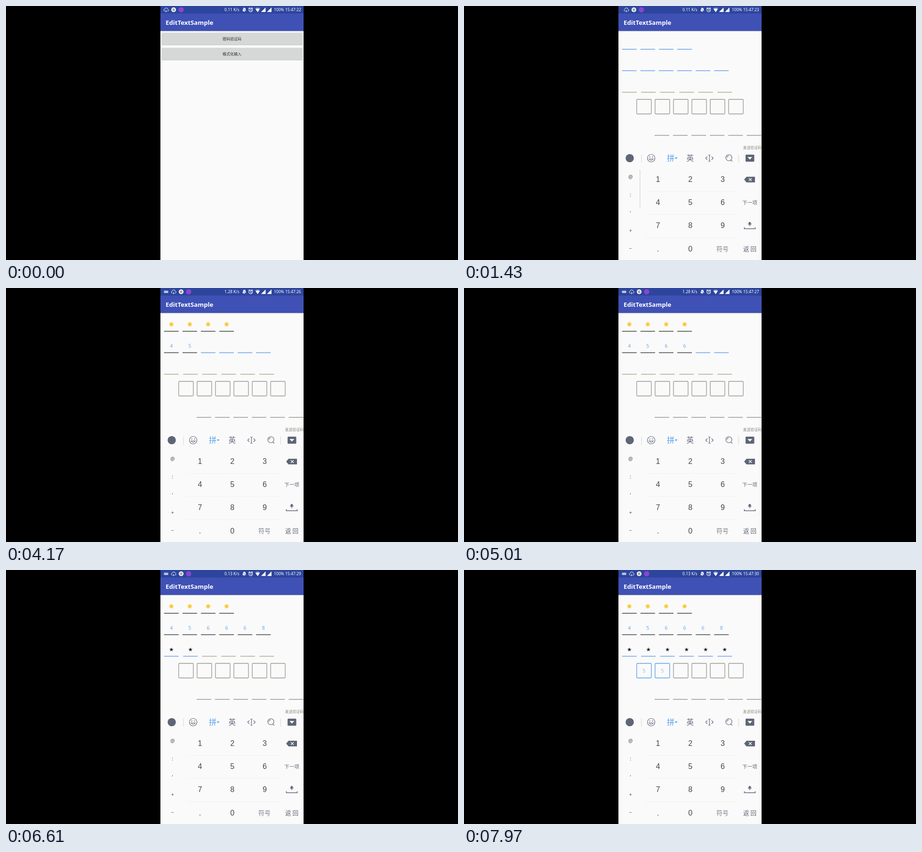
An HTML page with a canvas that plays this animation: 960x540 px, repeating every 8000 ms.

```html
<!DOCTYPE html>
<html lang="zh">
<head>
<meta charset="utf-8">
<title>EditTextSample</title>
<style>
html, body { margin: 0; width: 100%; height: 100%; overflow: hidden; background: #000; }
canvas { display: block; }
</style>
</head>
<body>
<canvas id="stage" width="960" height="540"></canvas>
<script>
const c = document.getElementById('stage').getContext('2d');
const LOOP = 8000;
const SANS = '"Noto Sans", "Open Sans", sans-serif';
const CJK = '"Noto Sans CJK SC", "Noto Sans CJK", sans-serif';
const ARIAL = '"Liberation Sans", sans-serif';
const PAPER = '#fafafa', PRIMARY = '#3f51b5', PRIMARY_DARK = '#2d459d';
const INK = '#5e6676', BLUE = '#6ea6ea', SKY = '#559fee';
const OLIVE = '#b0ae8c', GREY = '#a09f94', DARK = '#4c4c4a';

// Moments at which each character is entered
const typed = {
  suns: [1800, 2050, 2300, 2550],
  digits: [3500, 3880, 4300, 4720, 5300, 5620],
  stars: [6080, 6420, 6820, 7020, 7220, 7420],
  boxes: [7680, 7880]
};

const progress = (t, start, length) => Math.min(1, Math.max(0, (t - start) / length));
const easeOut = (u, power) => 1 - (1 - u) ** power;

function text(s, x, y, size, color, font = CJK, weight = 400, align = 'center') {
  c.font = `${weight} ${size}px ${font}`;
  c.textAlign = align;
  c.fillStyle = color;
  c.fillText(s, x, y + size * 0.37);
}

function rect(x, y, w, h, color) {
  c.fillStyle = color;
  c.fillRect(x, y, w, h);
}

function roundRect(x, y, w, h, r) {
  c.beginPath();
  c.roundRect(x, y, w, h, r);
}

function dot(x, y, r, color) {
  c.fillStyle = color;
  c.beginPath();
  c.arc(x, y, r, 0, 7);
  c.fill();
}

function shape(path, x, y, color) {
  c.save();
  c.translate(x, y);
  c.fillStyle = color;
  c.fill(new Path2D(path));
  c.restore();
}

function outline(path, x, y, color, width = 1.2) {
  c.save();
  c.translate(x, y);
  c.strokeStyle = color;
  c.lineWidth = width;
  c.stroke(new Path2D(path));
  c.restore();
}

function star(x, y, points, outer, inner, color) {
  c.fillStyle = color;
  c.beginPath();
  for (let i = 0; i < points * 2; i++) {
    const r = i % 2 ? inner : outer, a = i * Math.PI / points - Math.PI / 2;
    c.lineTo(x + r * Math.cos(a), y + r * Math.sin(a));
  }
  c.fill();
}

function sun(x, y) {
  star(x, y, 8, 5.6, 3.6, '#fcd75a');
  dot(x, y, 2.6, '#f8c544');
}

function button(label, y) {
  c.save();
  c.fillStyle = '#d6d7d7';
  c.shadowColor = 'rgba(60,60,60,.4)';
  c.shadowBlur = 1.5;
  c.shadowOffsetY = 0.6;
  roundRect(330.5, y, 299.5, 25.5, 1.5);
  c.fill();
  c.restore();
  text(label, 480, y + 12.7, 8, '#2e2e2e', CJK, 500);
}

function windowFrame() {
  rect(328, 0, 304, 540, PAPER);
  rect(328, 53, 304, 1, '#d6d6da');
  rect(328, 54, 304, 1, '#ececee');
  rect(328, 0, 304, 16, PRIMARY_DARK);
  rect(328, 16, 304, 37, PRIMARY);
  text('EditTextSample', 339, 35, 13.2, '#fff', SANS, 600, 'left');
}

function menuScreen() {
  windowFrame();
  button('密码验证码', 57);
  button('格式化输入', 89);
}

// A row of underlines, each with an optional symbol above once typed
function lines(t, x, y, count, pitch, width, empty, filled, times = [], symbol) {
  for (let i = 0; i < count; i++) {
    const done = t >= times[i];
    rect(x + i * pitch, y - 0.8, width, 1.6, done ? filled : empty);
    if (done) symbol(x + i * pitch + width / 2, y - 14.8, i);
  }
}

function inputScreen(t) {
  windowFrame();
  lines(t, 335.7, 92, 4, 39.1, 31, BLUE, DARK, typed.suns, sun);
  lines(t, 335.7, 137.5, 6, 39.1, 31, BLUE, DARK, typed.digits,
    (x, y, i) => text('456668'[i], x, y + 0.3, 10.5, BLUE, SANS));
  lines(t, 335.7, 183.4, 6, 40.5, 31, OLIVE, BLUE, typed.stars,
    (x, y) => star(x, y + 0.6, 5, 4.7, 1.9, '#222'));
  for (let i = 0; i < 6; i++) {
    const x = 366.8 + i * 39.05, done = t >= typed.boxes[i];
    c.strokeStyle = done ? SKY : '#96958a';
    c.lineWidth = 1.3;
    roundRect(x, 198.5, 31, 31, 1.5);
    c.stroke();
    if (done) text('5', x + 15.5, 214.2, 10, '#8fb8e2', SANS);
  }
  lines(t, 404.8, 275, 6, 39.1, 31, GREY);
  text('发送验证码', 592.5, 301, 7.9, '#85857f', CJK, 400, 'left');
  lines(t, 404.8, 312, 4, 29.6, 22.3, BLUE);
  button('改变输入方式', 324);
}

function toolbar() {
  const y = 323.5;
  dot(352, y, 8.7, INK);
  rect(376.5, 316, 1, 17, '#d4d4cc');
  rect(582.8, 316, 1, 17, '#d4d4cc');
  outline('M8 0A8 8 0 1 1-8 0A8 8 0 1 1 8 0M-4.5 1.5Q0 7.5 4.5 1.5Z', 397.5, y, INK);
  dot(394.6, y - 2.5, 1.1, INK);
  dot(400.4, y - 2.5, 1.1, INK);
  text('拼', 439, y - 0.5, 16, SKY);
  shape('M-3-1.5H3L0 2Z', 450.5, y, SKY);
  text('英', 480.3, y - 0.5, 15.5, INK);
  outline('M-2.5-6.5H2.5M0-6.5V6.5M-2.5 6.5H2.5M-4.5-3.5L-8 0L-4.5 3.5M4.5-3.5L8 0L4.5 3.5', 521.3, y, INK);
  outline('M6.5-1A6.5 6.5 0 1 1-6.5-1A6.5 6.5 0 1 1 6.5-1M4.3 4L7.5 7.2M-4-1A4 4 0 0 1 0-5', 562.5, y, INK);
  c.fillStyle = INK;
  roundRect(598, 316, 18.5, 15, 1.5);
  c.fill();
  shape('M-5-2.5H5L0 3Z', 607.2, y, PAPER);
}

function keyboard(t) {
  rect(328, 306, 304, 234, PAPER);
  toolbar();
  const scrollbar = 1 - progress(t, 1750, 250);
  rect(373.3, 348, 1, 80, `rgba(205,205,190,${scrollbar})`);
  for (const y of [394, 443.2, 492.2]) rect(384, y, 199, 0.8, '#efefee');
  [...'123456789.0'].forEach((key, i) =>
    text(key, 412 + i % 3 * 68.7, 367.8 + Math.floor(i / 3) * 49.3, 16, '#42454d', ARIAL));
  text('符号', 549, 516, 13, '#7a7f8a');
  [['@', 363.5], [':', 401], [',', 434.5], ['+', 477], ['−', 515.5]].forEach(([s, y]) =>
    text(s, 353.7, y, 10.5, '#42454d', SANS, 500));
  shape('M-12 0L-7-6H11V6H-7Z', 607, 369, INK);
  outline('M-2-3L4 3M4-3L-2 3', 607, 369, PAPER, 1.4);
  text('下一项', 607, 418, 10.7, INK);
  c.fillStyle = INK;
  roundRect(604.7, 459, 4.4, 6, 2.2);
  c.fill();
  outline('M-3.5-3Q-3.5 1 0 1Q3.5 1 3.5-3M0 1V3.5', 607, 465, INK, 0.9);
  outline('M-11.5-3V0H11.5V-3', 607, 473.5, INK, 1.7);
  text('返 回', 607, 516.3, 12.6, INK);
}

function statusBar(t) {
  const shift = 16 * easeOut(progress(t, 1390, 250), 2);
  const y = 8;
  c.save();
  c.globalAlpha = progress(t, 1440, 200);
  c.fillStyle = '#cfd9ea';
  roundRect(335.5, 5.8, 9, 4.6, 1);
  c.fill();
  for (let i = 0; i < 3; i++) rect(337 + i * 2.4, 7.2, 1.2, 0.9, PRIMARY_DARK);
  c.restore();

  outline('M-2.5 3H-3A2.3 2.3 0 0 1-3-1.5A3.3 3.3 0 0 1 3.4-1.5A2.3 2.3 0 0 1 3 3H2.5M0 4.5V0.5M-1.5 3L0 4.5L1.5 3',
    340 + shift, y, '#fff', 1);
  dot(356 + shift, y, 5, '#fff');
  dot(356 + shift, y, 2.9, '#a5a5a3');
  dot(372 + shift, y, 5.6, '#8a45d0');

  const speed = t < 2500 ? '0.11' : t < 5500 ? '1.28' : '0.13';
  const label = (s, x) => text(s, x, y, 8.5, '#fff', SANS, 500, 'left');
  label(speed + ' K/s', 464);
  label('100%', 569);
  label('15:47:' + (22 + Math.floor((t + 470) / 1000)), 593);

  shape('M-4 3L-3 1.5V-1Q-3-4 0-4.3Q3-4 3-1V1.5L4 3ZM-1.2 3.6H1.2L0 5Z', 506, y, '#fff');
  outline('M-4.5-4.5L4.5 4.5', 506, y, PRIMARY_DARK, 1);
  outline('M3.8 .5A3.8 3.8 0 1 1-3.8 .5A3.8 3.8 0 1 1 3.8 .5M0-1.8V.8L1.8 1.8M-4.6-2.5L-2.2-4.5M4.6-2.5L2.2-4.5',
    519.7, y, '#fff', 1.2);
  shape('M-5.5-3Q0-6.5 5.5-3L0 5Z', 534.5, y, '#8b9acb');
  shape('M-4.2-1Q0-3.5 4.2-1L0 5Z', 534.5, y, '#fff');
  for (const x of [546.7, 559.2]) shape('M-5 4.7H4.7V-5Z', x, y, '#fff');
}

function draw(t) {
  rect(0, 0, 960, 540, '#000');
  c.save();
  c.beginPath();
  c.rect(328, 0, 304, 540);
  c.clip();

  if (t < 820) menuScreen();
  if (t >= 467) {
    c.save();
    c.globalAlpha = easeOut(progress(t, 467, 200), 4);
    c.translate(0, 43 * (1 - easeOut(progress(t, 467, 350), 5)));
    inputScreen(t);
    c.restore();
  }
  if (t >= 1080) {
    const u = easeOut(progress(t, 1080, 220), 2);
    c.save();
    c.globalAlpha = u;
    c.translate(0, 60 * (1 - u));
    keyboard(t);
    c.restore();
  }
  statusBar(t);
  c.restore();
}

const start = performance.now();
function tick() {
  draw((performance.now() - start) % LOOP);
  requestAnimationFrame(tick);
}
tick();
</script>
</body>
</html>
```
